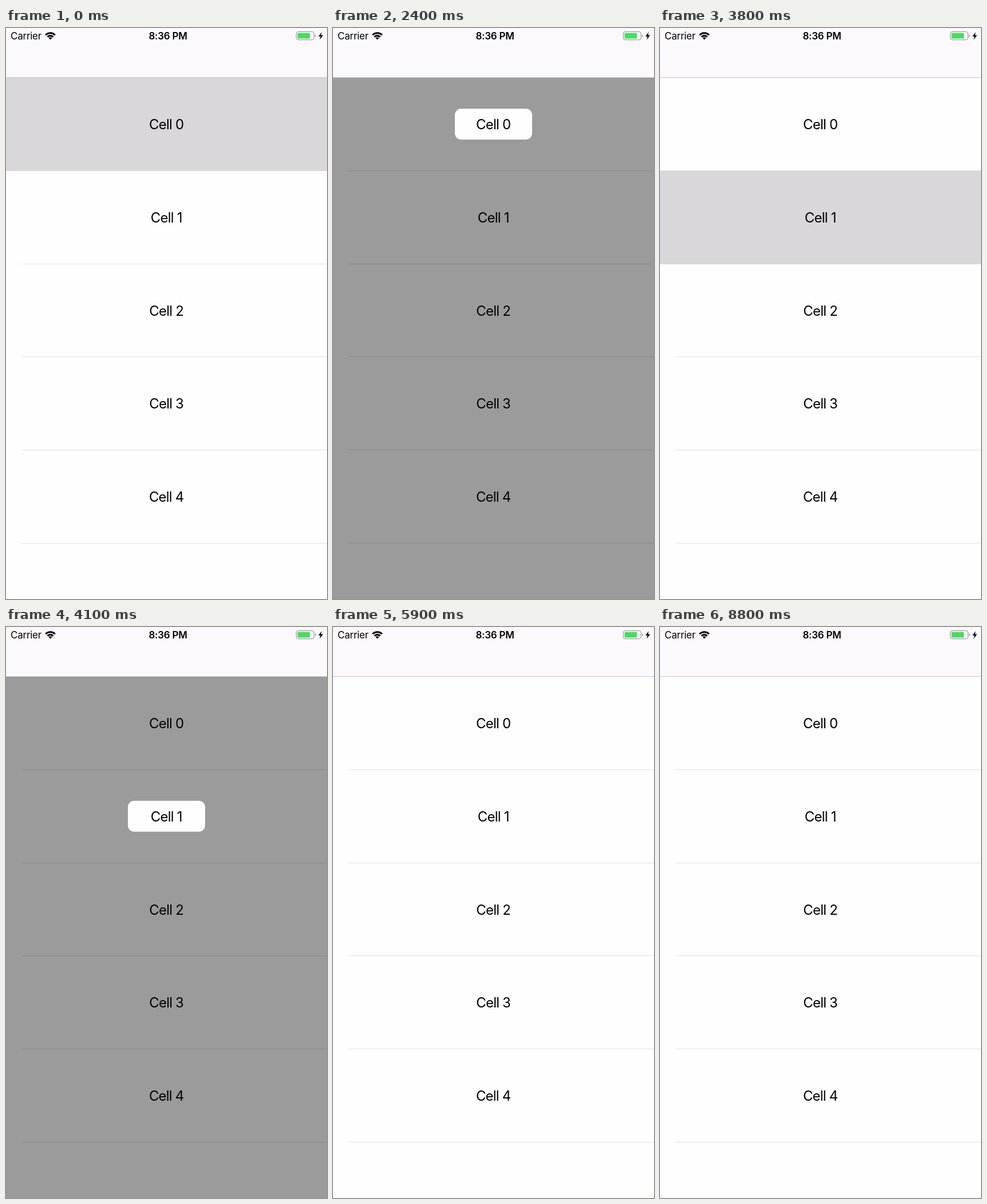
Animation of 561 by 998 pixels, one loop 8900 ms. Source, as an HTML page:

```html
<!DOCTYPE html>
<html lang="en">
<head>
<meta charset="utf-8">
<title>Cell highlight</title>
<style>
  html, body { margin: 0; width: 100%; height: 100%; overflow: hidden; background: #fefefe; }
  svg { display: block; width: 561px; height: 998px; }
  text { font-family: Inter, Roboto, sans-serif; fill: #000; }
  .cell { font-size: 24px; letter-spacing: -.8px; text-anchor: middle; }
  .status { font-size: 17px; letter-spacing: -.25px; }
  .time { font-weight: 600; text-anchor: middle; }
</style>
</head>
<body>
<svg viewBox="0 0 561 998">
  <rect width="561" height="998" fill="#fefefe"/>
  <g id="lines" fill="#e2e1e4"></g>
  <rect id="selection" width="561" fill="#d9d7da"/>
  <g id="labels"></g>
  <path id="dim" fill-rule="evenodd"/>

  <rect width="561" height="86" fill="#fbf9fc"/>
  <rect y="86" width="561" height="1" fill="#c8c7ca"/>
  <text class="status" x="8" y="20">Carrier</text>
  <g fill="none" stroke="#000" stroke-width="3">
    <path d="M69.2 12.2a11.8 11.8 0 0 1 16.6 0"/>
    <path d="M72.6 15.6a7 7 0 0 1 9.8 0"/>
  </g>
  <path d="M77.5 20.6l-3-3a4.3 4.3 0 0 1 6 0z"/>
  <text class="status time" x="283" y="20">8:36 PM</text>
  <rect x="507.3" y="6.5" width="31" height="14.2" rx="3.6" fill="none" stroke="#8b8a8c"/>
  <rect x="509.5" y="8.8" width="21.7" height="9.7" rx="1.2" fill="#4cd964"/>
  <path d="M540 11.2a2.6 2.6 0 0 1 0 4.8z" fill="#8b8a8c"/>
  <path d="M551.8 7l-5.8 7.8h3.6l-1.5 6 6-8.2h-3.7z"/>
</svg>
<script>
  const LOOP = 8900, PITCH = 162.75;
  const $ = id => document.getElementById(id);
  const lineY = i => i < 0 ? 87 : Math.floor(249 + PITCH * i + .25);

  // Times in ms: row selected, dimmed, fade-out start and end
  const taps = [
    { cell: 0, select: 0, dim: 300, fade: 2400, end: 2600, alpha: .393 },
    { cell: 1, select: 3800, dim: 4100, fade: 5500, end: 5900, alpha: .393 },
    { cell: 2, select: 6800, dim: 7000, fade: 8400, end: 8800, alpha: .357 }
  ];

  for (let i = 0; i < 5; i++) {
    $('lines').innerHTML += `<rect x="27" y="${lineY(i)}" width="534" height="1"/>`;
    $('labels').innerHTML += `<text class="cell" x="280.2" y="${177 + PITCH * i}">Cell ${i}</text>`;
  }

  // Shade over the list with a rounded hole around one label
  const shade = cell => `M0 87H561V998H0Z M224 ${141 + PITCH * cell}h113
    a11 11 0 0 1 11 11v32a11 11 0 0 1-11 11h-113a11 11 0 0 1-11-11v-32a11 11 0 0 1 11-11z`;

  const ease = u => u * u * (3 - 2 * u);

  function draw(now) {
    const t = Math.floor(now % LOOP / 100) * 100;
    const tap = taps.findLast(s => t >= s.select);
    const selected = t < tap.dim;
    const top = lineY(tap.cell - 1);
    $('selection').setAttribute('y', top);
    $('selection').setAttribute('height', lineY(tap.cell) + 1 - top);
    $('selection').setAttribute('opacity', selected ? 1 : 0);

    const u = Math.min(1, Math.max(0, (t - tap.fade) / (tap.end - tap.fade)));
    $('dim').setAttribute('d', shade(tap.cell));
    $('dim').setAttribute('opacity', selected ? 0 : tap.alpha * (1 - ease(u)));
  }

  const start = performance.now();
  function tick() {
    draw(performance.now() - start);
    requestAnimationFrame(tick);
  }
  tick();
</script>
</body>
</html>
```
